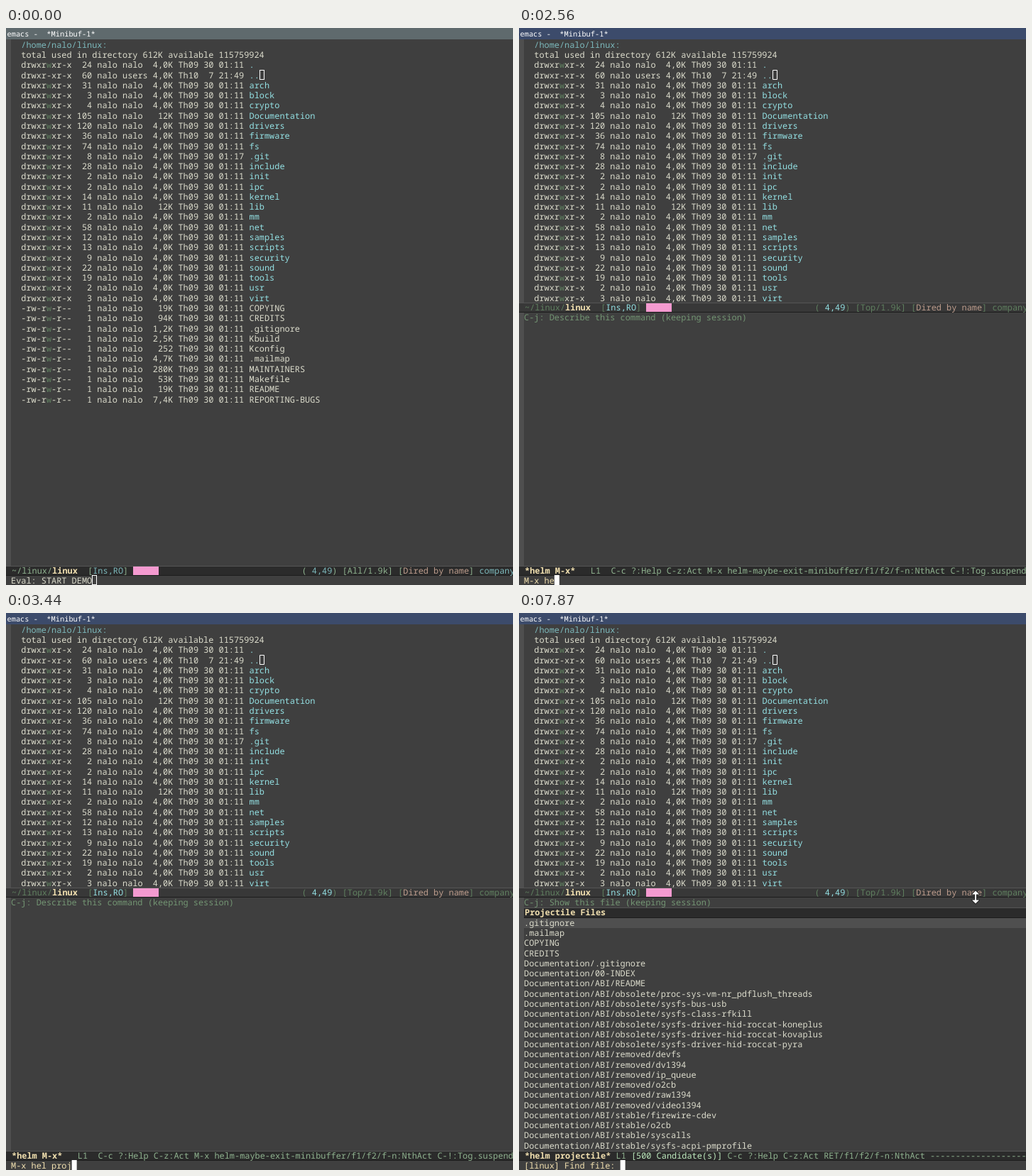
An HTML page with a canvas for the animation above (8000 ms loop, 714 by 785 pixels).

```html
<!DOCTYPE html>
<html lang="en">
<head>
<meta charset="utf-8">
<title>Helm session</title>
<style>
html, body { margin: 0; width: 714px; height: 785px; overflow: hidden; background: #3f3f3f; }
canvas { display: block; }
</style>
</head>
<body>
<canvas id="stage" width="714" height="785"></canvas>
<script>
const ctx = document.getElementById('stage').getContext('2d');
const W = 714, H = 785, CW = 7.14, RH = 14.28, LOOP = 8000;
const BG = '#3f3f3f', FG = '#dcdccc', DARK = '#2b2b2b', LINE = '#4f4f4f', CREAM = '#f0dfaf',
  BLUE = '#93e0e3', TEAL = '#7cb8bb', GREEN = '#8fb28f', DIM = '#5f7f5f', GOLD = '#ffd700',
  ORANGE = '#ffa500', TAN = '#bc9c8c';

const words = s => s.trim().split(/\s+/);

// Entries are name:links[:size[:time]]
const dirs = words(`.:24 ..:60 arch:31 block:3 crypto:4 Documentation:105:12K drivers:120
  firmware:36 fs:74 .git:8:4,0K:01:17 include:28 init:2 ipc:2 kernel:14 lib:11:12K mm:2 net:58
  samples:12 scripts:13 security:9 sound:22 tools:19 usr:2 virt:3`);
const files = words(`COPYING:1:19K CREDITS:1:94K .gitignore:1:1,2K Kbuild:1:2,5K Kconfig:1:252
  .mailmap:1:4,7K MAINTAINERS:1:280K Makefile:1:53K README:1:19K REPORTING-BUGS:1:7,4K`);

const commands = words(`*table--cell-dabbrev-expand *table--cell-end-of-line
  *table--cell-yank-clipboard-selection 5x5-crack Buffer-menu-2-window
  Buffer-menu-delete-backwards Buffer-menu-execute Buffer-menu-this-window Info-edit-mode
  Info-history-back Info-speedbar-browser Info-validate Info-virtual-index LaTeX-mode
  View-search-last-regexp-forward abort-recursive-edit about-emacs ad-activate
  ad-deactivate-regexp ad-recover ada-header animate-birthday-present auto-insert`);
const helmCommands = words(`M-x apropos bookmarks buffers-list calcul-expression colors
  complete-file-name-at-point dabbrev do-grep etags-select execute-kmacro find find-files
  google-suggest imenu info-emacs list-emacs-process locate man-woman mini mode occur
  recentf`).map(s => 'helm-' + s);
const projCommands = words(`ack ag find-dir|d find-file|f find-file-dwim|g find-other-file|a
  grep recentf switch-project|p switch-to-buffer|b`).map(s => 'helm-projectile-' + s);
const findCommands = projCommands.slice(2, 6);
const doc = (dir, list) => words(list).map(s => 'Documentation/' + dir + s);
const projectFiles = [
  ...words('.gitignore .mailmap COPYING CREDITS'),
  ...doc('', '.gitignore 00-INDEX ABI/README'),
  ...doc('ABI/obsolete/', `proc-sys-vm-nr_pdflush_threads sysfs-bus-usb sysfs-class-rfkill
    sysfs-driver-hid-roccat-koneplus sysfs-driver-hid-roccat-kovaplus
    sysfs-driver-hid-roccat-pyra`),
  ...doc('ABI/removed/', 'devfs dv1394 ip_queue o2cb raw1394 video1394'),
  ...doc('ABI/stable/', 'firewire-cdev o2cb syscalls sysfs-acpi-pmprofile')
];

const helpKeys = 'C-c ?:Help C-z:Act ', nth = '/f1/f2/f-n:NthAct ', suspend = 'C-!:Tog.suspend ';
const typedHelp = helpKeys + 'M-x helm-maybe-exit-minibuffer' + nth + suspend;
const typed = s => ({ mini: 'M-x ' + s, help: typedHelp });
const cleared = { list: null };
const shown = (list, count = list.length, match = []) => ({ list, count, match });

// Each step changes part of the state from its time on
const steps = [
  [0, { title: '*Minibuf-1*', bar: '#5f6a6d', mini: 'Eval: START DEMO', cursor: 'hollow', point: 'hollow',
    split: false, mouse: false, line: 1, plain: false, name: '*helm M-x*', head: 'Emacs Commands',
    hint: 'Describe this command' }],
  [910, { bar: '#3c4b6b', cursor: 'solid' }],
  [980, { title: 'linux', mini: '', cursor: '', point: 'solid' }],
  [1310, { title: '*Minibuf-1*', mini: 'M-x ', point: 'hollow' }],
  [1350, { cursor: 'solid' }],
  [1930, { split: true, mouse: true, help: helpKeys + 'RET' + nth + suspend, ...shown(commands, 500) }],
  [2480, { ...typed('h'), mouse: false }],
  [2520, cleared],
  [2560, typed('he')],
  [2700, typed('hel')],
  [2810, shown(helmCommands, 124, ['hel'])],
  [3040, typed('hel ')],
  [3200, cleared],
  [3240, typed('hel p')],
  [3280, typed('hel pr')],
  [3360, typed('hel pro')],
  [3440, typed('hel proj')],
  [3520, shown(projCommands, 10, ['hel', 'proj'])],
  [3720, typed('hel proj ')],
  [3880, typed('hel proj f')],
  [3960, typed('hel proj fi')],
  [4000, shown(findCommands, 4, ['hel', 'proj', 'fi'])],
  [4490, typed('hel proj fi ')],
  [4640, typed('hel proj fi f')],
  [4860, typed('hel proj fi fi')],
  [4920, typed('hel proj fi fil')],
  [4980, shown(findCommands.slice(1), 3, ['hel', 'proj', 'fil', 'fi'])],
  [5330, { line: 2 }],
  [5590, { line: 1, plain: true }],
  [6220, { cursor: '', point: 'solid', mouse: true }],
  [7870, { cursor: 'solid', point: 'hollow', mini: '[linux] Find file: ', name: '*helm projectile*',
    head: 'Projectile Files', hint: 'Show this file', help: helpKeys + 'RET' + nth,
    ...shown(projectFiles, 500) }]
];

function rect(x, y, w, h, color) {
  ctx.fillStyle = color;
  ctx.fillRect(x, y, w, h);
}

function text(s, x, mid, color, bold, size = 11.9) {
  ctx.font = `${bold ? 'bold ' : ''}${size}px "Noto Sans Mono", "DejaVu Sans Mono", monospace`;
  ctx.fillStyle = color;
  ctx.fillText(s, x, mid + 4);
}

// Draws [string, color, bold] runs side by side and returns the end
function runs(x, mid, list) {
  for (const [s, color, bold] of list) {
    text(s, x, mid, color, bold);
    x += s.length * CW;
  }
  return x;
}

function panel(x, y, h, color) {
  rect(x, y, W - x, h, color);
  rect(x, y, W - x, 1, '#555');
  rect(x, y + h - 1, W - x, 1, '#1c1c1c');
}

function caret(x, y, kind) {
  if (kind === 'solid') rect(x, y, 7, 14, '#fff');
  if (kind === 'hollow') {
    ctx.strokeStyle = '#fff';
    ctx.lineWidth = 1;
    ctx.strokeRect(Math.round(x) + .5, y + .5, 6, 13);
  }
}

function dired(s) {
  const bottom = s.split ? 387 : 758;
  ctx.save();
  ctx.beginPath();
  ctx.rect(0, 16, W, bottom - 16);
  ctx.clip();
  const x = 7 + 2 * CW, mid = i => 23.7 + i * RH;
  text('/home/nalo/linux:', x, mid(0), TEAL);
  text('total used in directory 612K available 115759924', x, mid(1), FG);
  [...dirs, ...files].forEach((entry, i) => {
    const [name, links, size = '4,0K', hh = '01', mm = '11'] = entry.split(':');
    const isDir = i < dirs.length, up = name === '..';
    const perms = up ? 'drwxr-xr-x' : isDir ? 'drwxrwxr-x' : '-rw-rw-r--';
    const when = up ? 'Th10  7 21:49' : `Th09 30 ${hh}:${mm}`;
    runs(x, mid(i + 2), [
      [perms.slice(0, 5), FG], [perms[5], up ? FG : DIM],
      [`${perms.slice(6)} ${links.padStart(3)} nalo ${up ? 'users' : 'nalo '} ${size.padStart(4)} ${when} `, FG],
      [name, isDir ? BLUE : FG]
    ]);
  });
  caret(x + 47 * CW, 59, s.point);
  ctx.restore();

  const on = !s.split, y = bottom + 6.7, soft = on ? GREEN : DIM, info = on ? TEAL : BLUE;
  panel(0, bottom, 14, on ? DARK : '#383838');
  runs(8, y, [['~/linux/', soft], ['linux', CREAM, true], ['  [', soft], ['Ins,RO', info], [']', soft]]);
  rect(179, bottom + 1, 36, 12, '#f49ad0');
  runs(416.5, y, [
    ['( ', soft], ['4,49', info], [') ', soft], [`[${on ? 'All' : 'Top'}/1.9k] [`, soft],
    ['Dired by name', TAN], ['] ', soft], ['company', on ? TEAL : DIM]
  ]);
}

function candidate(item, i, s) {
  const [name, key] = item.split('|'), mid = 436.8 + i * 14.27;
  const parts = s.match.length ? name.split(new RegExp(`(${s.match.join('|')})`)) : [name];
  let x = runs(7, mid, parts.map((p, k) => [p, k % 2 ? GOLD : FG]));
  if (!key) return;
  x = runs(x, mid, [[' (', FG]]);
  const end = runs(x, mid, [['C-c p ' + key, ORANGE]]);
  text(')', end, mid, FG);
  if (!(s.plain && i === 0)) rect(x, Math.round(mid + 5), end - x, 1, ORANGE);
}

function helm(s) {
  text(`C-j: ${s.hint} (keeping session)`, 7, 408, '#739573');
  if (s.list) {
    panel(7, 415, 15, DARK);
    text(s.head, 8, 422.3, CREAM, true);
    rect(7, 430 + (s.line - 1) * 14.27, W - 7, 14, LINE);
    s.list.forEach((item, i) => candidate(item, i, s));
  }
  panel(0, 758, 14, DARK);
  runs(8, 764.7, [
    [s.name, CREAM, true],
    [`${s.name.length < 12 ? '   ' : ' '}L${s.line} `, GREEN],
    [s.list ? `[${s.count} Candidate(s)] ` : ' ', '#bfebbf'],
    [s.help + '-'.repeat(40), GREEN]
  ]);
}

function mouse() {
  ctx.beginPath();
  for (const d of [-1, 1])
    for (const [x, y] of d < 0 ? [[-1, -4], [-5, -4], [0, -9], [5, -4], [1, -4]]
                               : [[1, 4], [5, 4], [0, 9], [-5, 4], [-1, 4]])
      ctx.lineTo(643 + x, 400.5 + y);
  ctx.closePath();
  ctx.lineJoin = 'round';
  ctx.lineWidth = 2;
  ctx.strokeStyle = '#222';
  ctx.stroke();
  ctx.fillStyle = '#fff';
  ctx.fill();
}

function draw(t) {
  const s = Object.assign({}, ...steps.filter(([at]) => at <= t).map(([, change]) => change));
  ctx.textRendering = 'geometricPrecision';
  rect(0, 0, W, H, BG);
  rect(0, 16, 7, 742, LINE);
  rect(0, 0, W, 16, s.bar);
  text('emacs -  ' + s.title, 1.5, 7.8, '#fff', false, 10.35);
  dired(s);
  if (s.split) helm(s);
  text(s.mini, 7, 779, s.mini.startsWith('Eval') ? FG : CREAM);
  caret(7 + s.mini.length * CW, 771, s.cursor);
  if (s.mouse) mouse();
}

const start = performance.now();
function tick() {
  draw((performance.now() - start) % LOOP);
  requestAnimationFrame(tick);
}
tick();
</script>
</body>
</html>
```
